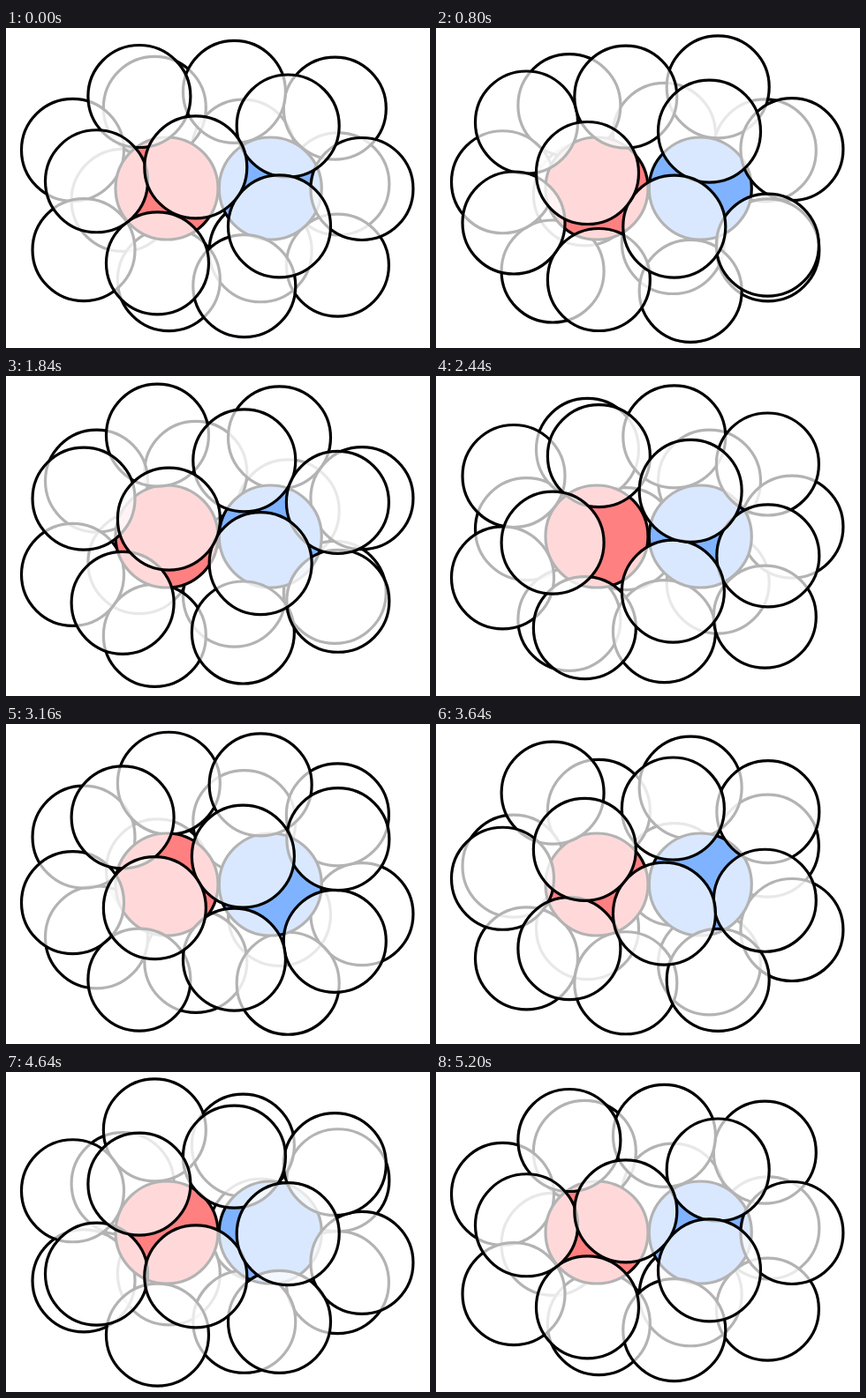
Animation, 480 px wide and 363 px high, one loop 5.24 s. Source, as an HTML page with a canvas:

```html
<!DOCTYPE html>
<html lang="en">
<head>
<meta charset="utf-8">
<title>Two ions with rotating shells</title>
<style>
  html, body { margin: 0; width: 100%; height: 100%; overflow: hidden; background: #fff; }
  canvas { display: block; }
</style>
</head>
<body>
<canvas id="stage" width="480" height="363"></canvas>
<script>
const ctx = document.getElementById('stage').getContext('2d');

const LOOP = 5240, STEP = 40, STEPS_PER_TURN = 130;
const AXIS_Y = 182, RADIUS = 58;
const CORE_GAP = 117, SHELL_GAP = 116;  // centre distances of touching balls
const VEIL = 'rgba(255,255,255,0.7)';

// Vectors are [x, y up, z towards the viewer], with the turning axis along x.
const add = (a, b) => a.map((v, i) => v + b[i]);
const sub = (a, b) => a.map((v, i) => v - b[i]);
const scale = (a, k) => a.map(v => v * k);
const dot = (a, b) => a.reduce((sum, v, i) => sum + v * b[i], 0);
const cross = (a, b) => [
  a[1] * b[2] - a[2] * b[1],
  a[2] * b[0] - a[0] * b[2],
  a[0] * b[1] - a[1] * b[0]
];

// A ball on the ion at a given x offset and angle around the axis.
function perch(ion, dx, deg) {
  const orbit = Math.sqrt(CORE_GAP ** 2 - dx ** 2);
  const angle = deg * Math.PI / 180;
  return add(ion, [dx, orbit * Math.sin(angle), orbit * Math.cos(angle)]);
}

// A ball touching the ion and the balls p and q, on the side of p x q.
function seat(ion, p, q) {
  const a = sub(p, ion), b = sub(q, ion), n = cross(a, b);
  const aa = dot(a, a), bb = dot(b, b), ab = dot(a, b), nn = dot(n, n);
  const reach = CORE_GAP ** 2 - SHELL_GAP ** 2;
  const ka = (reach + aa) / 2, kb = (reach + bb) / 2;
  const foot = add(
    scale(a, (ka * bb - kb * ab) / nn),
    scale(b, (kb * aa - ka * ab) / nn)
  );
  const rise = Math.sqrt(Math.max(0, CORE_GAP ** 2 - dot(foot, foot)));
  return add(ion, add(foot, scale(n, rise / Math.sqrt(nn))));
}

// The packing grows from two perched balls per ion; every other ball rests on neighbours.
function pack(red, blue) {
  const a = perch(red, -106.5, 116);
  const b = perch(red, -79.5, 5.5);
  const c = seat(red, b, a);
  const d = seat(red, a, b);
  const e = seat(red, a, d);
  const f = seat(red, a, e);
  const g = seat(red, b, c);
  const h = seat(red, c, f);

  const k = perch(blue, 19.9, 38);
  const l = perch(blue, 10.2, -21.6);
  const m = seat(blue, k, l);
  const n = seat(blue, k, m);
  const o = seat(blue, g, h);
  const p = seat(blue, m, o);
  const q = seat(blue, n, p);
  const r = seat(blue, q, p);

  const bridges = [seat(red, l, k), seat(blue, e, d), seat(blue, r, e)];
  return [a, b, c, d, e, f, g, h, k, l, m, n, o, p, q, r, ...bridges];
}

const red = [182, 0, 0], blue = [299.3, 0, 0];
const balls = [
  { pos: red, fill: '#ff8080' },
  { pos: blue, fill: '#80b3ff' },
  ...pack(red, blue).map(pos => ({ pos, fill: VEIL }))
];

function spin({ pos: [x, y, z], fill }, turn) {
  const c = Math.cos(turn), s = Math.sin(turn);
  return { x, y: AXIS_Y - (y * c + z * s), depth: z * c - y * s, fill };
}

function drawBall({ x, y, fill }) {
  ctx.beginPath();
  ctx.arc(x, y, RADIUS, 0, 2 * Math.PI);
  ctx.fillStyle = fill;
  ctx.fill();
  ctx.stroke();
}

function render(time) {
  const step = Math.floor((time % LOOP) / STEP);
  const turn = 2 * Math.PI * step / STEPS_PER_TURN;
  ctx.fillStyle = '#fff';
  ctx.fillRect(0, 0, 480, 363);
  ctx.strokeStyle = '#000';
  ctx.lineWidth = 3.2;
  balls.map(ball => spin(ball, turn))
    .sort((a, b) => a.depth - b.depth)
    .forEach(drawBall);
}

const begin = performance.now();
function tick() {
  render(performance.now() - begin);
  requestAnimationFrame(tick);
}
tick();
</script>
</body>
</html>
```
